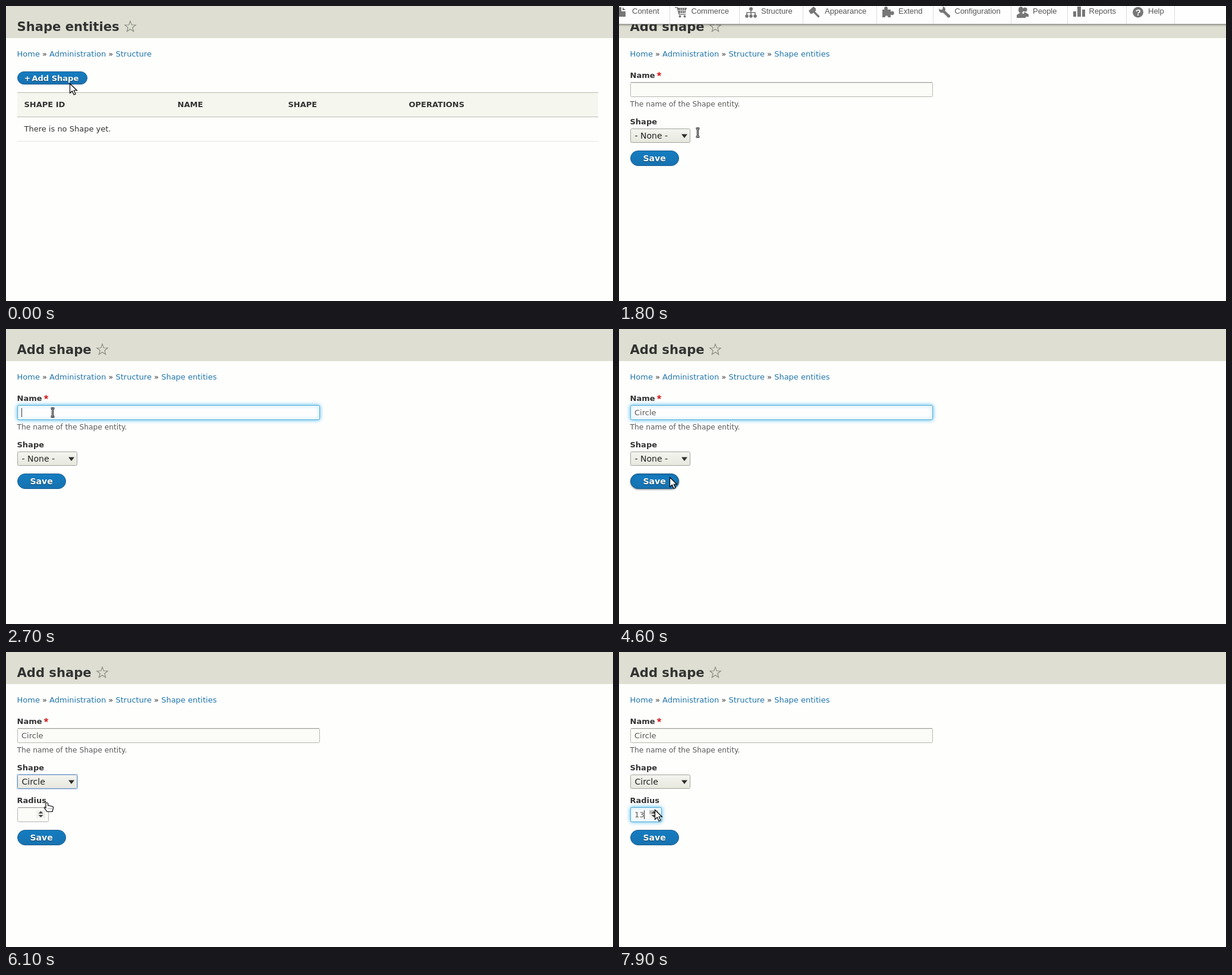
Write an HTML page with a canvas that moves like this. It is 1021 px wide and 496 px high and loops after 8000 ms.

```html
<!DOCTYPE html>
<html lang="en">
<head>
<meta charset="utf-8">
<title>Add shape</title>
<style>
html, body { margin: 0; width: 100%; height: 100%; overflow: hidden; background: #fefefd; }
canvas { display: block; }
</style>
</head>
<body>
<canvas id="stage" width="1021" height="496"></canvas>
<script>
const c = document.getElementById('stage').getContext('2d');
const LOOP = 8000, STEP = 100;
const INK = '#333', LINK = '#2175ab', ICON = '#777';
const SANS = '"DejaVu Sans", sans-serif', ARIAL = '"Liberation Sans", Arial, sans-serif';

// time, x, y, pointer kind
const MOVES = [
  [0, 107, 130, 'arrow'], [300, 107, 130, 'arrow'],
  [400, 107, 121, 'hand'], [500, 107, 121, 'hand'], [800, 104, 118, 'hand'], [1600, 104, 118, 'hand'],
  [1700, 118, 165, 'arrow'], [1800, 132.5, 213, 'beam'], [2100, 122, 206, 'beam'],
  [2500, 85, 160, 'beam'], [2600, 78.5, 140.5, 'beam'], [4400, 78.5, 140.5, 'beam'],
  [4500, 82, 200, 'arrow'], [4600, 85, 249, 'arrow'], [4800, 107, 222, 'arrow'], [5000, 107, 222, 'arrow'],
  [5100, 106, 234, 'arrow'], [5200, 106, 234, 'arrow'], [5300, 74, 250, 'arrow'], [5400, 74, 250, 'arrow'],
  [5500, 74, 251, 'hand'], [6000, 71, 252, 'hand'], [6100, 69, 253, 'hand'], [6300, 62, 260, 'arrow'],
  [6400, 52, 270, 'beam'], [6600, 44, 274, 'beam'], [6800, 52, 274, 'arrow'],
  [6900, 58, 274, 'arrow'], [7300, 58, 274, 'arrow'], [7400, 60, 265, 'arrow']
];
const NAME = [[3100, 'C'], [3300, 'Ci'], [3500, 'Circ'], [3600, 'Circl'], [4000, 'Circle']];
const RADIUS = [[7000, '10'], [7700, '11'], [7800, '12'], [7900, '13']];

const within = (t, a, b) => t >= a && t < b;
const ramp = (t, a, b) => Math.min(1, Math.max(0, (t - a) / (b - a)));
const valueAt = (list, t) => list.reduce((v, [at, s]) => t >= at ? s : v, '');

function text(s, x, y, size = 13, color = INK, weight = '', family = SANS) {
  c.font = `${weight} ${size}px ${family}`;
  c.fillStyle = color;
  c.fillText(s, x, y);
  return c.measureText(s).width;
}
function rect(x, y, w, h, color) {
  c.fillStyle = color;
  c.fillRect(x, y, w, h);
}
function fade(y, h, top, bottom) {
  const g = c.createLinearGradient(0, y, 0, y + h);
  g.addColorStop(0, top);
  g.addColorStop(1, bottom);
  return g;
}
function box(x, y, w, h, r, fill, stroke) {
  c.beginPath();
  c.roundRect(x + .5, y + .5, w - 1, h - 1, r);
  c.fillStyle = fill;
  c.fill();
  if (stroke) { c.strokeStyle = stroke; c.lineWidth = 1; c.stroke(); }
}
function poly(points, fill, stroke, width = 1) {
  c.beginPath();
  points.forEach(([x, y]) => c.lineTo(x, y));
  c.closePath();
  if (fill) { c.fillStyle = fill; c.fill(); }
  if (stroke) { c.strokeStyle = stroke; c.lineWidth = width; c.stroke(); }
}
function line(points, color, width) {
  c.beginPath();
  points.forEach(([x, y]) => c.lineTo(x, y));
  c.strokeStyle = color;
  c.lineWidth = width;
  c.stroke();
}
function disc(x, y, r, color) {
  c.beginPath();
  c.arc(x, y, r, 0, 7);
  c.fillStyle = color;
  c.fill();
}
function shadow(color, blur, y = 0) {
  c.shadowColor = color;
  c.shadowBlur = blur;
  c.shadowOffsetY = y;
}
const noShadow = () => shadow('transparent', 0);

function star(x, y) {
  const pts = [];
  for (let i = 0; i < 10; i++) {
    const r = i % 2 ? 4 : 9.6, a = i * Math.PI / 5;
    pts.push([x + r * Math.sin(a), y - r * Math.cos(a)]);
  }
  poly(pts, null, '#85857e', 1.1);
}

function header(title, starX, crumbs) {
  rect(0, 0, 1021, 496, '#fefefd');
  rect(0, 0, 1021, 54, '#dedfd2');
  text(title, 18.5, 42, 21.1, INK, 'bold');
  star(starX, 35);
  let x = 18.5;
  crumbs.forEach((s, i) => {
    if (i) x += text(' » ', x, 85);
    x += text(s, x, 85, 13, LINK);
  });
}

function pill(x, y, w, h, state) {
  const tones = { hover: ['#138fdb', '#1c82c2'], active: ['#0a6299', '#0e6dab'] }[state] || ['#147dc1', '#1772b0'];
  if (state) shadow('rgba(0,0,0,.35)', 3, 1);
  box(x, y, w, h, h / 2 - .5, fade(y, h, ...tones), '#1e5f92');
  noShadow();
}
function pillText(s, x, y, size) {
  shadow('rgba(0,0,0,.5)', 1, 1);
  text(s, x, y, size, '#fff', 'bold');
  noShadow();
}

function listPage(t) {
  header('Shape entities', 209, ['Home', 'Administration', 'Structure']);
  pill(19, 110, 118, 22, t < 400 ? '' : t === 700 ? 'active' : 'hover');
  pillText('+', 30.5, 126, 13);
  pillText('Add Shape', 43.5, 126, 13);
  rect(19, 145, 977, 42, '#f5f6ee');
  rect(19, 145, 977, 1, '#b9bcae');
  rect(19, 186, 977, 1, '#b9bcae');
  rect(19, 227, 977, 1, '#e4e4de');
  [['SHAPE ID', 30.5], ['NAME', 288.5], ['SHAPE', 474.5], ['OPERATIONS', 677.5]]
    .forEach(([s, x]) => text(s, x, 170, 13, INK, 'bold'));
  text('There is no Shape yet.', 30.5, 211);
}

function field(x, y, w, h, focus) {
  box(x, y, w, h, 2, '#fbfbf7', '#b6b6b0');
  rect(x + 1, y, w - 2, 1, '#999994');
  rect(x + 1, y + 1, w - 2, 1, '#ecece8');
  if (!focus) return;
  c.globalAlpha = focus;
  shadow('#46b9f2', 6);
  box(x, y, w, h, 2, '#fefefe', '#56aed6');
  noShadow();
  c.globalAlpha = 1;
}
function entry(s, y, caret) {
  const w = text(s, 26, y, 13, '#595959');
  if (caret) rect(Math.floor(26 + w), y - 12, 1, 15, '#333');
}
function select(label, focused, open) {
  box(19, 206, 101, 24, 2, open ? fade(206, 24, '#fdfdf8', '#dadbcb') : fade(206, 24, '#f5f5f0', '#e6e7dd'),
    focused ? '#6c94c9' : '#a3a39e');
  if (focused) {
    c.globalAlpha = .45;
    c.strokeStyle = '#6c94c9';
    c.strokeRect(18.5, 205.5, 102, 25);
    c.globalAlpha = 1;
  }
  text(label, 26.5, 223, 14, '#222');
  poly([[105, 215.5], [115, 215.5], [110, 222]], '#2e2e2e');
}
function menu(active) {
  shadow('rgba(0,0,0,.3)', 12, 3);
  box(19, 230, 101, 91, 0, '#fefefe', '#7399cc');
  noShadow();
  rect(20, 231 + 18 * active, 99, 18, '#2f8ff6');
  ['- None -', 'Circle', 'Ellipse', 'Rectangle', 'Star'].forEach((s, i) =>
    text(s, 27, Math.round(244 + i * 17.75), 14, i === active ? '#e8f3ff' : '#222'));
}
function spinner(pressed) {
  rect(51, 266, 15, 13, '#efefec');
  if (pressed) rect(51, 266, 15, 6.5, '#bcbcbc');
  poly([[54.5, 271.5], [62.5, 271.5], [58.5, 267.5]], '#444');
  poly([[54.5, 274], [62.5, 274], [58.5, 278]], '#444');
}
function throbber(t) {
  const a = t / 100;
  c.beginPath();
  c.arc(132, 218, 5, a, a + 4.6);
  c.strokeStyle = '#2f8fd0';
  c.lineWidth = 2;
  c.stroke();
  text('Please wait...', 143, 222);
}

const ICONS = {
  doc() {
    poly([[-2, 2], [4, 2], [4, 9], [11, 9], [11, 18], [-2, 18]], ICON);
    poly([[6, 2], [11, 7], [6, 7]], ICON);
  },
  cart() {
    line([[94, 2.5], [98, 2.5], [101, 14], [112, 14]], ICON, 1.6);
    poly([[98.5, 3], [114, 3], [111.5, 12], [101, 12]], ICON);
    for (let i = 0; i < 3; i++) line([[103 + i * 3.5, 3], [103.5 + i * 3, 12]], '#fff', .7);
    line([[99, 7.5], [113, 7.5]], '#fff', .7);
    disc(102.5, 17.5, 2, ICON);
    disc(110.5, 17.5, 2, ICON);
  },
  tree() {
    disc(222, 5, 3, ICON);
    line([[222, 5], [222, 17]], ICON, 1.6);
    line([[215, 17], [215, 11], [229, 11], [229, 17]], ICON, 1.6);
    [215, 222, 229].forEach(x => disc(x, 17, 2.8, ICON));
  },
  hammer() {
    poly([[319, 8], [327, 1], [331, 4], [331, 8], [325, 13], [322, 13]], ICON);
    line([[327, 9], [336.5, 18.5]], ICON, 3.2);
  },
  puzzle() {
    rect(443, 6, 14, 13, ICON);
    disc(449, 4, 3, ICON);
    disc(459.5, 12, 3.2, ICON);
    disc(450, 18.5, 2.3, '#fff');
  },
  wrench() {
    line([[545, 8], [555, 17.5]], ICON, 4.5);
    disc(543.5, 6, 5.5, ICON);
    poly([[538, -1], [545, 1], [544, 6], [539, 6]], '#fff');
    disc(554.5, 17, 2.5, ICON);
  },
  people() {
    disc(683, 6, 3.6, ICON);
    poly([[679, 18], [682, 10], [689, 14], [689, 18]], ICON);
    c.beginPath();
    c.ellipse(676, 6.5, 4.2, 5.5, 0, 0, 7);
    c.fillStyle = ICON;
    c.fill();
    poly([[669, 20], [669, 15], [674, 12], [678, 12], [684, 15], [684, 20]], ICON);
  },
  bars() {
    rect(764, 9, 5, 9, ICON);
    rect(771, 1, 6, 17, ICON);
    rect(779, 6, 5, 12, ICON);
  },
  help() {
    disc(873, 10.5, 9, ICON);
    text('?', 868.8, 16, 15, '#fff', 'bold', ARIAL);
  }
};
const TABS = [['Content', 22, 85, 'doc'], ['Commerce', 121.5, 202, 'cart'], ['Structure', 239, 309, 'tree'],
  ['Appearance', 346, 433, 'hammer'], ['Extend', 470, 528, 'puzzle'], ['Configuration', 564.5, 659, 'wrench'],
  ['People', 696, 754, 'people'], ['Reports', 790.5, 853, 'bars'], ['Help', 890, 934, 'help']];

function toolbar() {
  shadow('rgba(0,0,0,.4)', 3, 1);
  rect(-5, -5, 1031, 36, '#fefefe');
  noShadow();
  rect(0, 30, 1021, 1, '#9c9c98');
  TABS.forEach(([s, x, edge, icon]) => {
    ICONS[icon]();
    text(s, x, 13, 13, '#565656', '', ARIAL);
    rect(edge, 0, 1, 30, '#dcdcdc');
  });
}

function formPage(t) {
  header('Add shape', 162, ['Home', 'Administration', 'Structure', 'Shape entities']);
  text('Name', 18.5, 121, 13, INK, 'bold');
  for (let i = 0; i < 5; i++) {
    const a = i * Math.PI * .4;
    line([[67.5, 114.5], [67.5 + 3.6 * Math.sin(a), 114.5 - 3.6 * Math.cos(a)]], '#d81e1e', 1.7);
  }
  field(19, 128, 509, 25, ramp(t, 2500, 2700) * (1 - ramp(t, 4700, 4900)));
  entry(valueAt(NAME, t), 145, within(t, 2600, 4300));
  text('The name of the Shape entity.', 18.5, 169, 12.25, '#5a5a5a');
  text('Shape', 18.5, 199, 13, INK, 'bold');

  const open = within(t, 4900, 5500), expanded = t >= 6000;
  select(t < 5500 ? '- None -' : 'Circle', within(t, 4800, 6700), open);
  if (within(t, 5600, 6000)) throbber(t);
  if (expanded) {
    text('Radius', 18.5, 254, 13, INK, 'bold');
    field(19, 261, 53, 25, ramp(t, 6600, 6800));
    spinner(t >= 7600);
    entry(valueAt(RADIUS, t), 278, t >= 6700);
  }
  const y = expanded ? 299 : 243;
  pill(19, y, 82, 26, t === 4600 ? 'over' : within(t, 5500, 6000) ? 'hover' : '');
  pillText('Save', 40.5, y + 18, 14);
  if (open) menu(t < 5100 ? 0 : 1);
  if (t < 1900) toolbar();
}

const POINTERS = {
  arrow() {
    poly([[.5, .5], [.5, 16.5], [4.3, 13], [7.2, 19.3], [10, 18], [7.2, 12], [12.3, 12]], '#fff', '#000', 1.2);
  },
  beam() {
    const stem = [[-3, -7], [-.8, -7], [0, -6], [.8, -7], [3, -7]];
    const draw = (color, w) => {
      line(stem, color, w);
      line(stem.map(([x, y]) => [x, -y]), color, w);
      line([[0, -6.5], [0, 6.5]], color, w);
    };
    draw('#000', 3);
    draw('#fff', 1);
  },
  hand() {
    c.beginPath();
    c.moveTo(-2, 9);
    c.lineTo(-2, 1.5);
    c.quadraticCurveTo(-.2, -1, 1.6, 1.5);
    c.lineTo(1.6, 5);
    c.lineTo(9, 6.5);
    c.quadraticCurveTo(10.8, 7, 10.5, 9);
    c.lineTo(9, 15.5);
    c.lineTo(0, 15.5);
    c.lineTo(-4.6, 9);
    c.quadraticCurveTo(-4.5, 6.5, -2, 9);
    c.closePath();
    c.fillStyle = '#fff';
    c.fill();
    c.strokeStyle = '#000';
    c.lineWidth = 1.2;
    c.stroke();
    [1.5, 4, 6.5].forEach(x => rect(x, 9.5, 1, 1.5, '#555'));
  }
};
function pointer(t) {
  let i = MOVES.length - 1;
  while (MOVES[i][0] > t) i--;
  const a = MOVES[i], b = MOVES[i + 1] || a;
  const k = b === a ? 0 : ramp(t, a[0], b[0]);
  c.save();
  c.translate(a[1] + (b[1] - a[1]) * k, a[2] + (b[2] - a[2]) * k);
  POINTERS[a[3]]();
  c.restore();
}

function frame() {
  const t = Math.floor(performance.now() % LOOP / STEP) * STEP;
  (t < 1700 ? listPage : formPage)(t);
  pointer(t);
  requestAnimationFrame(frame);
}
frame();
</script>
</body>
</html>
```
